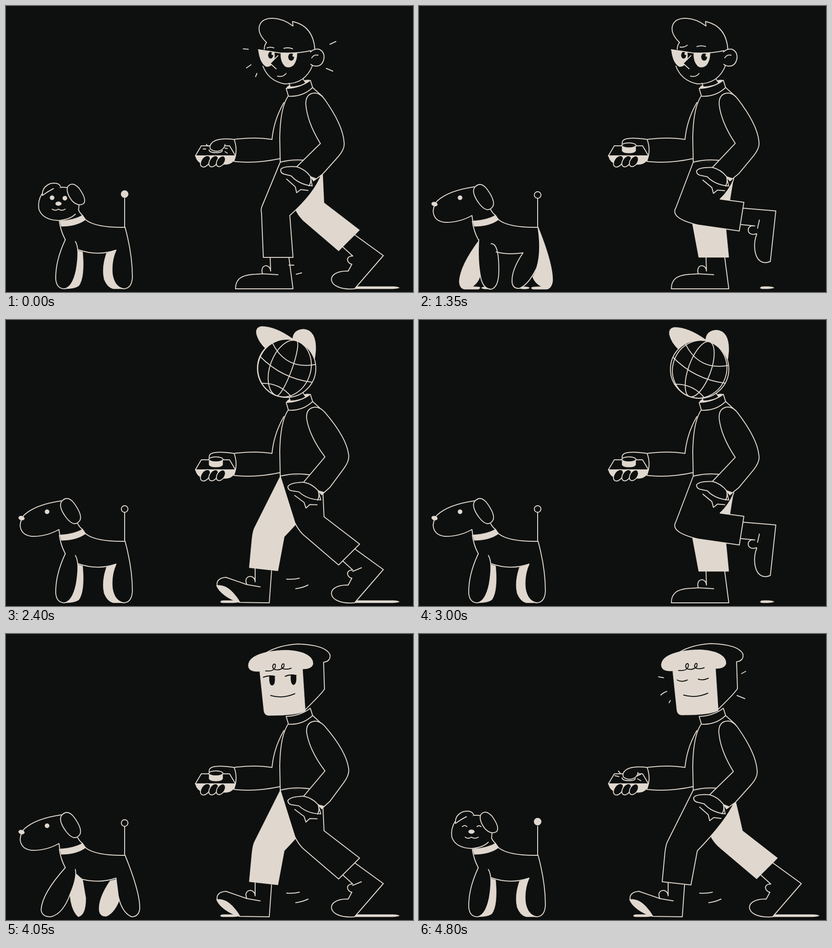
Animation, 892 px wide and 628 px high, one loop 4950 ms. Source, as an HTML page:

```html
<!DOCTYPE html>
<html lang="en">
<head>
<meta charset="utf-8">
<title>Walking the dog</title>
<style>
  html, body { margin: 0; width: 100%; height: 100%; overflow: hidden; background: #0e100f; }
  svg { display: block; width: 100vw; height: 100vh; }
  svg * { fill: #0e100f; stroke: #e0d8cf; stroke-width: 2; stroke-linejoin: round; stroke-linecap: round; }
  svg .line { fill: none; }
  svg .cream { fill: #e0d8cf; stroke-width: .6; }
  svg .ink { fill: none; stroke: #0e100f; }
  svg .dark { stroke: none; }
</style>
</head>
<body>
<svg id="stage" viewBox="0 0 892 628"></svg>
<script>
const STEP = 150, COUNT = 33, CYCLE = 11;
const stage = document.getElementById('stage');

const path = (d, cls = '') => `<path class="${cls}" d="${d}"/>`;
const line = d => path(d, 'line');
const cream = d => path(d, 'cream');
const ink = d => path(d, 'ink');
const oval = (x, y, rx, ry = rx, cls = '', turn = 0) =>
  `<ellipse class="${cls}" cx="${x}" cy="${y}" rx="${rx}" ry="${ry}" transform="rotate(${turn} ${x} ${y})"/>`;
const group = (move, body) => `<g transform="${move}">${body}</g>`;

const NUM = /-?\d+(\.\d+)?/g;
const shift = (d, dx) => { let i = 0; return d.replace(NUM, v => i++ % 2 ? v : +v + dx); };
const mix = (a, b, t) => {
  const to = b.match(NUM);
  let i = 0;
  return a.replace(NUM, v => +(+v + (to[i++] - v) * t).toFixed(1));
};

// ---- legs: trousers, shoe and ground shadow keyed over one full stride ----
const flat = 'M620 552L629 621L503 621C503 600 515 590 548 589L562 588C556 566 579 565 580 582L579 552M562 588L596 590';
const strike = 'M582 551L577 621L512 620C462 604 446 568 482 565L528 581C518 561 545 556 546 575L546 546M528 581L557 586';
const tip = 'M765 503L827 548L764 621C700 626 698 580 750 582L758 567C748 566 742 549 760 549L738 529M760 552L779 544';
const tipLate = 'M733 498L792 542L761 621C700 626 708 577 744 578L743 563C731 563 724 544 741 544L709 525M745 550L759 539';
const lifted = 'M711 444L782 450L770 561C735 575 730 525 740 502L740 500C716 508 716 478 736 483L706 480M742 488L746 470';

const shadow = (a, b) => `M${a} 619Q${a} 616 ${a + 7} 616L${b - 12} 616Q${b} 617 ${b} 619Q${b - 8} 621 ${b - 14} 621L${a + 7} 621Q${a} 621 ${a} 619`;
const WAIST = 'L668 340';
const leg = d => 'M601 343L' + d + WAIST;
const plant = leg('561 440Q558 446 560 454L564 552L629 552L622 460Q678 410 692 368');
const reach = leg('545 455Q541 462 539 480L533 544L596 551L610 476Q674 410 692 368');
const trail = leg('633 445Q640 460 651 471L729 538L775 492L697 432Q696 410 694 367');

const stride = [
  [0, plant, flat, shadow(700, 740)],
  [1.5, leg('573 440Q571 446 571 456L576 552L642 552L636 460Q674 412 690 374'), shift(flat, 14), shadow(720, 780)],
  [2, leg('586 436Q582 450 582 462L587 552L651 552L644 460Q672 420 688 376'), shift(flat, 24), shadow(730, 790)],
  [3.5, leg('597 430Q598 455 599 477L613 552L679 552L673 490Q680 430 690 376'), shift(flat, 50), shadow(740, 800)],
  [4.5, leg('638 442Q646 459 661 471L740 538L786 492L709 432Q702 400 694 367'), shift(tip, 11), shadow(768, 877)],
  [5, trail, tip, shadow(757, 862)],
  [5.5, trail, tip, shadow(757, 862)],
  [7, leg('607 430Q609 463 617 468L700 535L740 486L672 430Q680 405 688 376'), tipLate, shadow(754, 841)],
  [7.5, leg('573 440Q568 455 580 461L700 537L740 486L668 425Q680 405 688 376'), tipLate, shadow(754, 841)],
  [9, leg('563 443Q549 466 612 481L702 494L712 431L660 424Q680 405 690 380'), lifted, shadow(748, 778)],
  [10, reach, strike, shadow(470, 512)],
  [10.5, reach, strike, shadow(470, 512)],
  [11, plant, flat, shadow(470, 512)]
];

function drawLeg(u, far) {
  const i = stride.findIndex((k, n) => u >= k[0] && u < stride[n + 1][0]);
  const a = stride[i], b = stride[i + 1], t = (u - a[0]) / (b[0] - a[0]);
  let [trousers, shoe, ground] = [1, 2, 3].map(n => mix(a[n], b[n], t));
  const behind = u >= 4.5 && u <= 9, landing = u >= 10;
  if (far && behind) shoe = shoe.slice(0, shoe.lastIndexOf('M'));
  return (behind || landing ? cream(ground) : '') + path(shoe) +
    (landing ? cream('M461 583Q480 580 497 598Q508 610 513 620Q470 606 461 583Z') : '') +
    path(trousers, far ? 'cream' : '');
}

function swish(phase) {
  if (phase === 10 || phase === 5) return line('M615 569Q630 570 643 567M635 590Q650 588 662 582');
  return phase === 0 ? line('M620 569L631 569M636 589L648 586') : '';
}

// ---- upper body ----
const device = thumb => {
  const pad = path('M428 307L490 307L503 329L415 329Z') +
    cream('M415 329L503 329Q500 347 482 348L436 348Q419 346 415 329Z');
  const fingers = [437, 455, 471].map((x, i) => oval(x, 341, 9 - i * .4, 14 - i * .5, '', 35)).join('');
  const button = cream('M445 306L445 318Q447 323 460 323Q473 323 475 318L475 306Z') + oval(460, 306, 15.5, 5.5);
  const rest = path('M500 293Q452 286 446 297Q444 302 447 306');
  const raised = path('M500 295Q482 280 458 280Q446 281 446 289Q448 297 458 296L469 295Q473 296 472 299');
  const pressed = line('M445 316Q446 322 460 322Q474 322 474 317') +
    path('M500 293Q468 289 454 298Q444 306 448 314Q456 321 468 318Q479 314 480 304');
  const body = thumb === 'press' ? pad + pressed : (thumb === 'up' ? raised : rest) + pad + button;
  return body + fingers;
};

const backArm = line('M609 212Q587 250 583 293Q545 287 500 293Q509 318 499 341Q545 347 601 335');
const torso = line('M619 197Q601 222 600 290L601 343Q630 335 668 340M672 179L694 199');
const collar = path('M614 181Q645 180 667 163L672 179Q650 200 619 198Z');
const neck = cream('M615 180Q617 174 624 174L656 163Q664 161 667 164Q645 182 615 180Z') +
  path('M620 168L623 178Q645 177 657 169L651 160');

const frontArm =
  path('M637 353Q608 351 602 359Q601 368 613 370L625 373Q642 392 671 395L667 374') +
  line('M668 376Q669 388 664 395M615 380L634 397L637 410L646 403L662 405') +
  path('M637 353L689 302Q660 255 657 215Q657 191 678 191Q688 192 697 203Q739 262 741 300Q743 314 728 331L694 369L674 384L667 374Q655 358 637 353Z') +
  cream('M667 374L674 384L680 379Z');
const armTurn = [0, -.5, -1.2, -2.6, -4.2, -5.4, -4, -2.8, -2.4, -2.2, 0];

// ---- heads ----
function face(phase) {
  const brows = phase < 3 ? 'M572 92Q580 89 587 92M609 93Q619 90 628 94' : 'M572 90Q580 92 588 86M609 89Q619 86 628 89';
  return oval(617, 108, 59, 61, 'dark') +
    line('M563 132Q575 164 610 171Q656 172 672 130') +
    path('M566 95Q566 86 571 80Q552 62 555 45Q560 26 586 27Q608 28 629 44L628 34Q674 44 677 97') +
    path('M667 101Q676 93 686 95Q698 100 697 114Q694 133 678 132Q671 131 668 128') +
    line('M670 114Q675 106 684 108') +
    cream('M553 96L588 101Q591 118 583 128Q578 134 570 133Q556 125 553 96Z') +
    cream('M602 103L638 103Q638 120 630 130Q620 138 611 132Q601 122 602 103Z') +
    oval(580, 108, 5.5, 7.5, 'dark') + oval(625, 112, 6.5, 8, 'dark') +
    oval(584, 105, 2, 2.4, 'cream') + oval(630, 109, 2, 2.4, 'cream') +
    path('M596 109L579 126L592 138L600 130Z', 'dark') + line('M596 109L579 126L592 138') +
    line('M553 96L600 103Q640 105 668 98' + brows + 'M595 154Q607 157 614 148');
}

function globe(index) {
  const turn = -10 - (index - 13) * 90 / CYCLE;
  let meridians = '';
  for (let lon = ((turn % 45) + 45) % 45 - 90; lon < 90; lon += 45) {
    const w = 64 * Math.sin(lon * Math.PI / 180);
    meridians += line(`M0 -64A${Math.abs(w).toFixed(2)} 64 0 0 ${w > 0 ? 1 : 0} 0 64`);
  }
  return cream('M628 43Q590 16 560 16Q546 18 549 33Q553 50 570 66L628 60Z') +
    cream('M628 43Q630 23 652 22Q680 24 679 68L677 86L640 70Z') +
    group('translate(615 108)', oval(0, 0, 64) +
      group('rotate(20)', meridians) +
      group('rotate(26)', line('M-52 -36Q0 4 53 -35M-64 2Q0 25 64 3M-35 54Q0 35 37 52')));
}

function bread(phase, tongue) {
  const eyes = phase === 10
    ? ink('M566 104Q576 110 588 104M612 102Q622 106 634 100')
    : ink('M564 97Q576 92 589 95M612 95Q622 90 636 93') +
      path('M577 95L589 95Q591 114 583 115Q576 114 577 95Z', 'dark') +
      path('M624 93L636 93Q638 112 630 114Q623 112 624 93Z', 'dark');
  return path('M570 43Q600 26 640 24Q700 26 710 47Q712 62 696 64L698 123Q690 135 655 169') +
    cream('M531 71Q531 50 575 41Q620 33 650 43Q674 52 673 68Q670 79 650 79L656 171Q640 181 575 181Q566 180 565 170L556 84Q531 86 531 71Z') +
    ink('M569 83Q586 85 590 75Q592 67 587 68Q581 75 589 80Q601 83 609 74Q611 66 606 68Q600 77 611 79Q618 80 625 77') +
    eyes + ink('M580 137Q606 145 633 133') + (tongue ? ink('M600 140Q606 146 612 140') : '');
}

// ---- sparks around the head and the device ----
const tails = {
  1: [[538, 58], [530, 117], [560, 166], [691, 105], [691, 139]],
  2: [[524, 21], [689, 6]]
};
function sparks(kind, phase) {
  let d = '';
  if (phase === 10) d = 'M525 94L536 96M530 134Q535 129 543 126M548 151L551 146M707 87L716 82M697 135L714 142';
  else if (phase === 0 && kind !== 1) d = 'M520 94L531 95M527 136L537 129M547 155L550 148M710 84L723 78M702 137L716 143';
  else if (phase < 3 && tails[kind]) {
    for (const [x, y] of tails[kind]) {
      const a = Math.atan2(y - 105, x - 616), len = 12 - phase * 4, back = 4 - phase * 2;
      const at = r => `${(x - r * Math.cos(a)).toFixed(1)} ${(y - r * Math.sin(a)).toFixed(1)}`;
      d += `M${at(back)}L${at(back + len)}`;
    }
  }
  if (phase === 10) d += 'M437 301L442 307M429 311L438 313M477 312L486 308M479 318L486 322';
  if (phase === 0) d += 'M439 304L443 308M432 314L438 314M480 312L485 313M480 320L485 323';
  return d && line(d);
}

// ---- dog ----
const dogLegs = {
  together:
    cream('M150 534L158 537L168 540Q173 595 160 614Q152 621 128 621Q150 605 156 560Z') +
    cream('M220 543L241 536L245 600L258 621L235 621Q222 618 215 600Q209 575 220 543Z') +
    path('M130 513Q108 560 109 600Q111 621 128 621Q146 618 154 580Q162 533 152 517') +
    path('M261 486Q277 545 277 595Q276 620 258 621Q238 618 233 590Q230 560 241 536') +
    line('M158 535Q200 550 241 536'),
  farOut:
    cream('M131 515Q90 570 88 605Q89 621 100 622L130 622Q137 619 132 617L118 616Q130 607 134 594Q130 560 131 515Z') +
    cream('M262 487Q295 570 293 605Q290 621 280 622L250 622Q242 619 250 617L268 616Q253 608 249 595Q270 560 262 487Z') +
    oval(148, 619, 11, 2.5, 'cream') + oval(231, 619, 11, 2.5, 'cream') +
    path('M131 513Q128 560 135 595Q140 621 158 622Q175 618 175 580Q175 520 158 522') +
    path('M228 542Q202 580 204 607Q206 621 220 620Q240 612 258 575Q269 540 261 487') +
    line('M169 540Q195 547 228 542'),
  nearOut:
    cream('M140 530Q135 600 158 621Q175 618 175 580L168 539L152 525Z') +
    cream('M228 542Q202 580 204 607Q206 621 220 620Q240 612 252 575L245 538Z') +
    path('M130 513Q79 570 77 605Q78 621 98 621Q125 615 141 570Q156 535 152 517') +
    path('M261 486Q295 570 293 605Q290 621 275 621Q254 612 246 575L241 536') +
    line('M154 535Q200 550 241 536')
};
const gait = ['together', 'farOut', 'together', 'nearOut'];

const sideHead =
  path('M118 473L116 460Q88 476 56 475Q32 472 31 450Q33 435 40 428Q65 405 122 397') +
  path('M122 398Q135 384 149 402Q168 428 162 440Q150 457 132 434Q114 410 122 398Z') +
  oval(90, 421, 4.8, 4.8, 'cream') + oval(34, 435, 6.5, 4.5, 'cream', 15) + line('M157 447Q161 455 168 460');

const frontHead = happy =>
  path('M79 412Q69 428 72 446Q80 470 116 471Q140 469 152 457M103 402Q120 396 135 399') +
  path('M80 416Q78 398 97 390Q117 386 120 398M80 416Q92 407 104 401') +
  path('M135 397Q145 384 160 400Q178 425 170 434Q158 441 145 428Q131 410 135 397Z') +
  (happy ? line('M95 423Q100 418 105 423M127 423Q131 419 136 423')
         : oval(101, 421, 4.8, 4.8, 'cream') + oval(129, 422, 4.8, 4.8, 'cream')) +
  oval(115, 434, 6.5, 4.3, 'cream') +
  line('M101 446Q108 451 115 446Q122 451 130 446M160 437L159 448Q162 455 168 460');

function dog(index) {
  const looking = index > 30 || index < 3;
  return dogLegs[looking ? 'together' : gait[index % 4]] +
    line('M117 473Q120 495 130 513M174 469Q196 487 261 486M260 486L260 422') +
    (looking ? oval(260, index === 32 ? 412 : 413, 8, 8, 'cream') : oval(260, 415, 7.3)) +
    (looking ? frontHead(index === 32) : sideHead) +
    cream('M118 472Q150 470 168 459L175 469Q155 484 121 484Z');
}

function draw(index) {
  const phase = index % CYCLE, kind = Math.floor(index / CYCLE);
  const thumb = phase === 10 || phase === 0 ? 'press' : phase > 5 && phase < 9 ? 'up' : 'rest';
  const bob = phase === 10 || phase === 4 ? -3 : phase === 5 ? -2 : 0;
  const head = [() => face(phase), () => globe(index), () => bread(phase, index > 22 && index < 26)][kind]();
  stage.innerHTML = dog(index) +
    drawLeg((phase + CYCLE / 2) % CYCLE, true) + drawLeg(phase, false) + swish(phase) +
    backArm + device(thumb) + torso + (kind < 2 ? neck : '') + collar +
    group(`rotate(${armTurn[phase]} 680 195)`, frontArm) +
    group(`translate(0 ${bob})`, head) + sparks(kind, phase);
}

const start = performance.now();
let shown = -1;
function tick() {
  const index = Math.floor((performance.now() - start) / STEP) % COUNT;
  if (index !== shown) draw(shown = index);
  requestAnimationFrame(tick);
}
tick();
</script>
</body>
</html>
```
